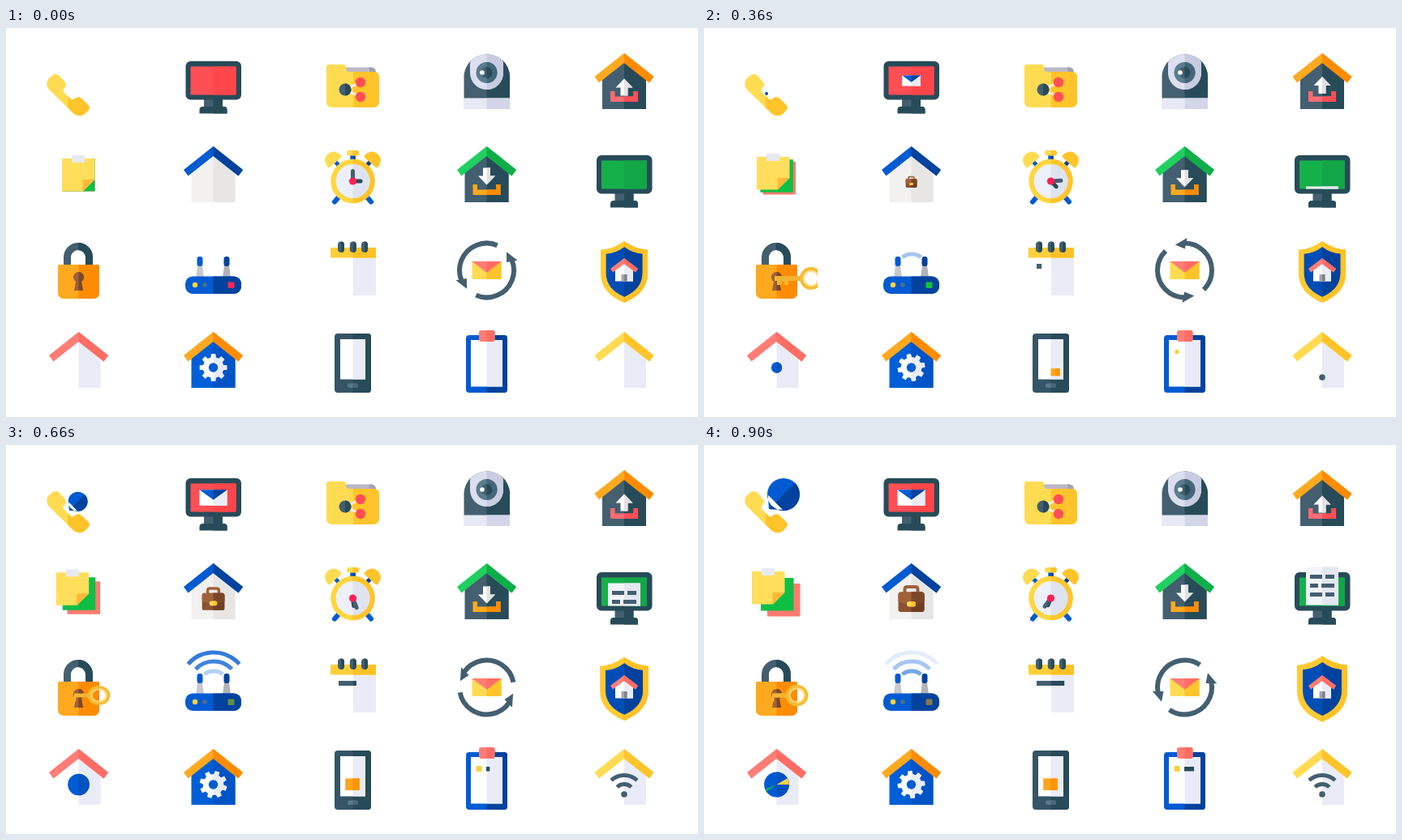
Write an HTML page with a canvas that moves like this. It is 853 px wide and 480 px high and loops after 960 ms.

```html
<!DOCTYPE html>
<html lang="en">
<head>
<meta charset="utf-8">
<title>Remote work icons</title>
<style>
html, body { margin: 0; width: 100%; height: 100%; overflow: hidden; background: #fff; }
canvas { display: block; width: 853px; height: 480px; }
</style>
</head>
<body>
<canvas id="stage" width="853" height="480"></canvas>
<script>
const LOOP = 960, STEP = 60;
const c = document.getElementById('stage').getContext('2d');

// Colour pairs: lit left half, shaded right half
const SLATE = ['#435f70', '#284b59'], BLUE = ['#005bd3', '#00429d'];
const ORANGE = ['#ffa91f', '#ff8c00'], YELLOW = ['#ffdb52', '#ffc42a'];
const CORAL = ['#ff7d75', '#ff6c64'], RED = ['#ff4f55', '#ff464b'];
const GREEN = ['#20d060', '#0fae48'], PAGE = ['#fff', '#e9ecf6'];
const BROWN = ['#a1613a', '#7a4729'], DARK = ['#284b59', '#284b59'];

const rad = d => d * Math.PI / 180;
const ramp = (k, a, b) => Math.min(1, Math.max(0, (k - a) / (b - a)));
const keys = (k, pts) => {
  const i = pts.findIndex(p => p[0] >= k);
  if (i < 0) return pts[pts.length - 1][1];
  if (i === 0) return pts[0][1];
  const [a, u] = pts[i - 1], [b, v] = pts[i];
  return u + (v - u) * (k - a) / (b - a);
};

const path = d => new Path2D(d);
const box = (x, y, x2, y2, r = 0) => {
  const p = new Path2D();
  p.roundRect(x, y, x2 - x, y2 - y, r);
  return p;
};
const disc = (x, y, r) => {
  const p = new Path2D();
  p.arc(x, y, r, 0, 2 * Math.PI);
  return p;
};
const fill = (p, color) => { c.fillStyle = color; c.fill(p); };
const within = (clip, draw) => { c.save(); c.clip(clip); draw(); c.restore(); };
const split = (p, x, [l, r]) => {
  fill(p, l);
  within(box(x, -999, x + 999, 999), () => fill(p, r));
};
const line = (p, color, width, cap = 'butt') => {
  c.strokeStyle = color;
  c.lineWidth = width;
  c.lineCap = cap;
  c.stroke(p);
};
const at = (x, y, s, draw, turn = 0) => {
  if (s <= 0) return;
  c.save();
  c.translate(x, y);
  c.rotate(turn);
  c.scale(s, s);
  draw();
  c.restore();
};
const arc = (x, y, r, half, color, width) => {
  const p = new Path2D();
  p.arc(x, y, r, -Math.PI / 2 - half, -Math.PI / 2 + half);
  line(p, color, width);
};

function house(x, y, roof, body) {
  at(x, y, 1, () => {
    split(path('M0 6L27 28V69H-27V28Z'), 0, body);
    split(path('M0 0L36.5 29L31 36.5L0 12L-31 36.5L-36.5 29Z'), 0, roof);
  });
}

function monitor(x, y, screen, content) {
  at(x, y, 1, () => {
    split(box(-11.5, 46, 11.5, 57), 0, SLATE);
    split(path('M-17 64.5V60Q-17 56 -13 56H13Q17 56 17 60V64.5Z'), 0, DARK);
    fill(box(-34, 0, 34.5, 47.5, 6), DARK[0]);
    split(box(-28, 6.5, 28, 41.5, 1), 0, screen);
    content();
  });
}

function mail(w, h, body, flap) {
  split(box(-w, -h, w, h), 0, body);
  split(path(`M${-w} ${-h}H${w}L0 ${h * .25}Z`), 0, flap);
}

function tray(x, y, color) {
  at(x, y, 1, () => split(path('M-17 0H-11.5V6.5H11.5V0H17V13H-17Z'), 0, color));
}

function arrow(x, y, dir) {
  at(x, y, 1, () => {
    const d = path(`M0 0L10.5 ${-11 * dir}H4.5V${-21 * dir}H-4.5V${-11 * dir}H-10.5Z`);
    split(d, 0, ['#fff', '#e2e1e4']);
  });
}

function phoneCall(k) {
  split(path('M58 58Q62 55.5 66 59L73 67Q76 70 72 74Q69 77 72 80L79 87Q82 90 85 87' +
    'Q89 83.500 93 87L101 94.500Q104.500 98 101 102L97 106Q91 110.500 84 106L53 76Q48 69 52 63Z'), 76, YELLOW);
  const s = ramp(k, 5, 15);
  at(74.5 + 23.5 * s, 83 - 22 * s, s, () => {
    const p = disc(0, 0, 20);
    p.addPath(path('M-13 14L0 25.500L13 14Z'));
    split(p, 0, BLUE);
  }, Math.PI / 4);
}

function folder() {
  split(box(414, 48.5, 456, 70, 6), 448, ['#bcb9c5', '#a4a2b0']);
  split(path('M398 45H416Q419 45 419 48V50Q419 54 423 54H453Q460 54 460 61V90' +
    'Q460 98 452 98H402Q395 98 395 91V48Q395 45 398 45Z'), 428, YELLOW);
  line(path('M437 67L418 76L437 85'), '#f3f0e6', 3);
  split(disc(418, 76, 7.5), 418, SLATE);
  fill(disc(437, 67, 6.2), RED[0]);
  fill(disc(437, 85, 6.2), RED[0]);
}

function camera() {
  const dome = path('M564.500 88V59A28.300 28.300 0 0 1 621 59V88Z');
  split(dome, 592.5, SLATE);
  within(dome, () => split(box(572, 25, 613, 76, 20.5), 592.5, ['#dcdff0', '#c9cce0']));
  split(disc(592.5, 55, 13), 592.5, ['#5b7d8e', '#44667a']);
  split(disc(592.5, 55, 7), 592.5, SLATE);
  fill(disc(587, 55, 2.8), '#fff');
  split(box(564, 86.5, 621, 100), 592.5, ['#e7eaf5', '#d3d6e9']);
}

function notes(k) {
  const u = k / 15, x = 69 - 10 * u, y = 161 - 5 * u, sheet = 40.5;
  const square = (a, b, color) => fill(box(a, b, a + sheet, b + sheet), color);
  square(69 + 9 * u, 161 + 10 * u, '#ff7b70');
  square(69 + u, 161 + 3 * u, '#0fbf45');
  at(x, y, 1, () => {
    fill(path('M0 0H40.500V26L26 40.500H0Z'), '#ffde5c');
    fill(path('M25.500 40.500V26H40.500Z'), '#ffb836');
    fill(box(12, -4, 28, 5), '#e7eaf3');
  });
}

function briefcase(s) {
  at(255.5, 190, s, () => {
    line(path('M-8 -7V-12Q-8 -15 -5 -15H5Q8 -15 8 -12V-7'), BROWN[0], 4);
    split(box(-16, -8.5, 16, 16, 3), 0, ['#8c5231', '#6d3f25']);
    split(path('M-13 -8.500H13Q16 -8.500 16 -5V3Q8 6.500 0 6.500Q-8 6.500 -16 3V-5Q-16 -8.500 -13 -8.500Z'), 0, BROWN);
    split(box(-5.5, 3, 5.5, 9.5, 3), 0, YELLOW);
  });
}

function clock(k) {
  at(427.5, 189, 1, () => {
    for (const side of [-1, 1]) {
      line(path(`M${side * 16} 18L${side * 22.5} 25.500`), BLUE[0], 6, 'round');
      line(path(`M${side * 16} -18L${side * 22.5} -25`), side < 0 ? BLUE[0] : BLUE[1], 5);
      at(side * 24, -26, 1, () =>
        fill(path('M-11 2Q-10 -10 0 -10Q10 -10 11 2Q11 4 8 4H-8Q-11 4 -11 2Z'), YELLOW[side < 0 ? 0 : 1]),
        side * rad(42));
    }
    split(box(-3.2, -33, 3.2, -25), 0, BLUE);
    split(box(-7.5, -38, 7.5, -31.5, 3), 0, YELLOW);
    split(disc(0, 0, 27.2), 0, ['#ffd63f', '#ffc42a']);
    split(disc(0, 0, 21), 0, ['#edf0f8', '#dfe3f0']);
    at(0, 0, 1, () => line(path('M0 0V-9.500'), SLATE[1], 5, 'round'), rad(90 + 7.5 * k));
    at(0, 0, 1, () => line(path('M0 0V-12.500'), SLATE[0], 5, 'round'), rad(14.4 * k));
    fill(disc(0, 0, 4.6), '#ff1f52');
  });
}

function report(k) {
  within(box(-28, -10, 28, 41.5), () => at(0, 68.5 - 5 * k, 1, () => {
    split(box(-20, 0, 20, 47), 0, ['#f2f4fa', '#e3e7f2']);
    [0, 5, 0].forEach((shift, i) => {
      const y = 9.5 + 11 * i;
      fill(box(-15, y, -shift, y + 5), SLATE[0]);
      fill(box(4 - shift, y, 15, y + 5), SLATE[0]);
    });
  }));
}

function padlock(k) {
  split(path('M71 296V283A18 18 0 0 1 107 283V296H98V283A9 9 0 0 0 80 283V296Z'), 89, SLATE);
  split(box(64, 292, 115, 334, [2, 2, 7, 7]), 89.5, ORANGE);
  split(path('M86 313A6.500 6.500 0 1 1 93 313L95 324H84Z'), 89.5, BROWN);
  const x = 114.5 + .7 * Math.max(0, 11 - k) ** 2;
  const flat = Math.max(.25, Math.abs(Math.cos(rad(32 * Math.max(0, k - 10)))));
  within(box(84, 290, 140, 330), () => {
    c.translate(x, 309);
    c.scale(1, flat);
    fill(path('M-12 -3H-45V3H-42V8H-36V4H-33V8H-28V3H-12Z'), '#f3b431');
    line(disc(0, 0, 12), '#f8bb35', 4);
    line(disc(0, 0, 9), '#ffdf83', 2);
  });
}

function router(k) {
  const inner = keys(k, [[4, 0], [6, .35], [8, 1], [10, .5], [12, .08], [15, .55]]);
  const middle = keys(k, [[6, 0], [8, .45], [10, 1], [12, .48], [15, .35]]);
  const outer = keys(k, [[6, 0], [8, .09], [10, .6], [12, 1], [15, .11]]);
  [[19, .65, inner], [31, .8, middle], [42, .85, outer]].forEach(([r, half, a]) => {
    c.globalAlpha = a;
    arc(256, 298, r, half, BLUE[0], 5);
  });
  c.globalAlpha = 1;
  [239, 272].forEach((x, i) => {
    fill(path(`M${x - 3} 293L${x - 5} 308H${x + 5}L${x + 3} 293Z`), ['#c6c9cd', '#b0b4b9'][i]);
    fill(box(x - 3.5, 282, x + 3.5, 294, 3), BLUE[i]);
  });
  split(box(221, 306.5, 290, 328, 9), 255.5, BLUE);
  fill(disc(233, 317, 3.2), '#ffd43c');
  fill(disc(245, 317, 2.8), '#4d7186');
  const g = keys(k, [[0, 0], [3, 1], [6, 1], [8, .1], [10, .3], [12, 1], [15, .5]]);
  fill(box(273.5, 313.5, 281.5, 321, 1), `rgb(${255 - 235 * g},${40 + 155 * g},${85 - 25 * g})`);
}

function notepad(k) {
  split(box(400, 280, 456, 330), 428, PAGE);
  split(box(400, 271, 456, 283.5), 428, ['#ffcf3a', '#ffc124']);
  for (const x of [413, 427.8, 442]) split(box(x - 4, 263.5, x + 4, 277, 4), x, SLATE);
  const w = 3.1 * Math.max(0, k - 4);
  if (w) split(box(410, 291, 410 + w, 297), 428, SLATE);
}

function syncMail(k) {
  at(592.5, 299, 1, () => mail(18, 11, YELLOW, CORAL));
  for (const half of [0, 180]) {
    at(592.5, 299, 1, () => {
      const ring = new Path2D();
      ring.arc(0, 0, 33.5, rad(-23), rad(113));
      line(ring, SLATE[0], 6);
      const pt = (r, a) => `${r * Math.cos(rad(a))} ${r * Math.sin(rad(a))}`;
      fill(path(`M${pt(33.5, -43)}L${pt(40, -18)}L${pt(26.5, -22)}Z`), SLATE[0]);
    }, rad(half - 11.25 * k));
  }
}

function shield(k) {
  const shape = path('M0 -38Q14 -28 29 -27.500V2Q29 26 0 38Q-29 26 -29 2V-27.500Q-14 -28 0 -38Z');
  at(762, 301, 1 + .07 * ramp(k, 8, 15), () => {
    split(shape, 0, ['#ffca33', '#ffc125']);
    c.scale(.77, .81);
    split(shape, 0, ['#004db6', '#00429d']);
  });
  at(762, 284, 1, () => {
    split(path('M0 4L11 12V28.500H-11V12Z'), 0, PAGE);
    split(path('M0 0L17 13L14 17.500L0 7L-14 17.500L-17 13Z'), 0, CORAL);
    split(box(-3.5, 20, 3.5, 28.5), 0, ['#a3a5ad', '#7f828c']);
  });
}

function pie(k, s) {
  at(89.5, 419, s, () => {
    split(disc(0, 0, 15.4), 0, ['#005bd3', '#0052c0']);
    const grow = ramp(k, 12, 15);
    const wedge = (end, size, color) => {
      const p = new Path2D('M0 0');
      p.arc(0, 0, 15.4, rad(end - size * grow), rad(end));
      p.closePath();
      if (grow) fill(p, color);
    };
    wedge(0, 30, '#ffd447');
    wedge(158, 12, '#12b54a');
  });
}

function gear(k) {
  const p = new Path2D();
  for (let i = 0; i < 32; i++) {
    const r = i % 4 < 2 ? 17 : 12.8;
    const a = rad(45 * (i >> 2) + [-9, 9, 14, 31][i % 4] + 5.625 * k);
    p.lineTo(r * Math.cos(a), r * Math.sin(a));
  }
  p.closePath();
  at(255.5, 419, 1, () => {
    split(p, 0, PAGE);
    fill(disc(0, 0, 5.7), BLUE[0]);
  });
}

function mobile(k) {
  split(box(405, 377, 450, 450, 4), 427.5, ['#355567', '#284b59']);
  split(box(412, 384, 443, 433.5), 427.5, PAGE);
  split(box(421, 438.5, 434, 444, 2.5), 427.5, ['#5b7888', '#48687a']);
  const s = ramp(k, .5, 9.3);
  at(427 + 16 * (1 - s), 418.7 + 16 * (1 - s), s, () => {
    split(box(-8.8, -7.3, 8.8, 7.3), 0, ['#ffa41f', '#ff9500']);
  });
}

function clipboard(k) {
  split(box(567, 379, 618, 450, 4), 592.5, BLUE);
  split(box(573, 385, 612, 442.5), 592.5, PAGE);
  split(box(583, 373, 602.5, 387, 3), 592.5, CORAL);
  at(583, 399.5, ramp(k, 1.2, 8), () => fill(box(-3.4, -3.4, 3.4, 3.4), '#ffcd35'));
  const w = 1.95 * Math.max(0, k - 8.8);
  if (w) fill(box(592, 397, 592 + w, 402.5), SLATE[1]);
}

function wifi(k) {
  within(box(740, 395, 785, 440), () => {
    at(762, 431, ramp(k, 4, 6), () => fill(disc(0, 0, 3.8), SLATE[0]));
    if (k >= 9) arc(762, 431, 12.5, .78, SLATE[0], 4.8);
    if (k >= 11) arc(762, 431, 23.5, .75, SLATE[0], 4.8);
  });
}

function draw(k) {
  c.fillStyle = '#fff';
  c.fillRect(0, 0, 853, 480);
  const sway = Math.cos(2 * Math.PI * k / 16), grow = ramp(k, 1, 12.6);

  phoneCall(k);
  monitor(255.5, 41, RED, () =>
    at(0, 24, ramp(k, 1.2, 8.4), () => mail(17, 9.8, PAGE, BLUE)));
  folder();
  camera();
  house(762, 31, ORANGE, SLATE);
  tray(762, 78, ['#ff6b72', '#ff4f55']);
  arrow(762, 61 + 1.5 * sway, -1);

  notes(k);
  house(255.5, 146, BLUE, ['#f2f1f0', '#e8e6e5']);
  briefcase(grow);
  clock(k);
  house(592.5, 146, GREEN, SLATE);
  tray(592.5, 193, ORANGE);
  arrow(592.5, 195 - 1.6 * sway, 1);
  monitor(762, 157, ['#16b04b', '#12a646'], () => report(k));

  padlock(k);
  router(k);
  notepad(k);
  syncMail(k);
  shield(k);

  house(89.5, 375, CORAL, PAGE);
  pie(k, grow);
  house(255.5, 375, ORANGE, ['#005fd8', '#0054c6']);
  gear(k);
  mobile(k);
  clipboard(k);
  house(762, 375, YELLOW, PAGE);
  wifi(k);
}

const start = performance.now();
function tick() {
  draw(Math.floor((performance.now() - start) % LOOP / STEP));
  requestAnimationFrame(tick);
}
tick();
</script>
</body>
</html>
```
